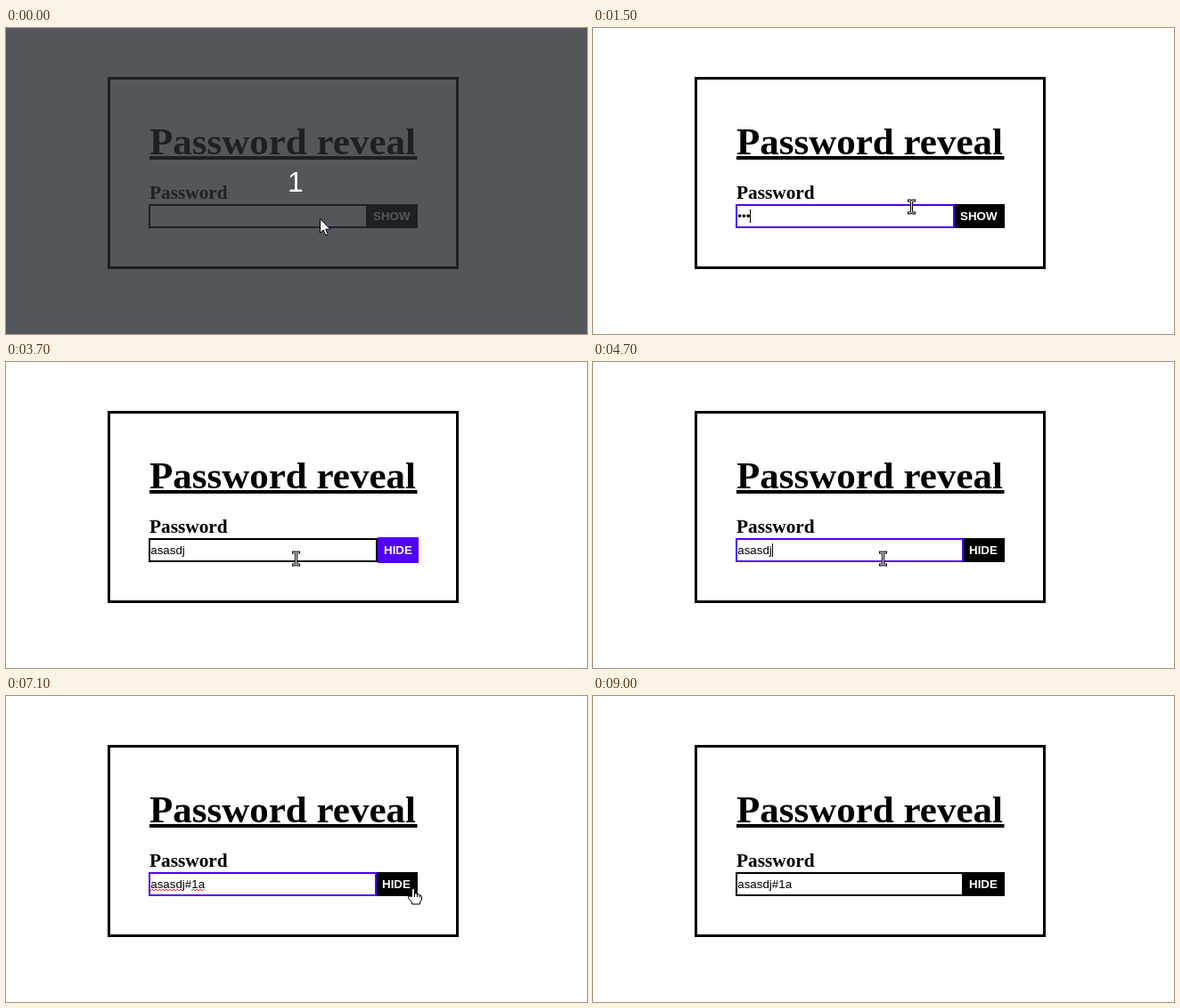
An HTML page that plays this animation: 652 px wide and 344 px high, repeating every 9.1 s.

```html
<!DOCTYPE html>
<html lang="en">
<head>
<meta charset="utf-8">
<title>Password reveal</title>
<style>
  html, body { margin: 0; width: 100%; height: 100%; overflow: hidden; background: #fff; }
  svg { display: block; width: 652px; height: 344px; }
  .serif { font-family: "Liberation Serif", "Times New Roman", serif; font-weight: bold; }
  .sans { font-family: "Liberation Sans", Arial, sans-serif; font-size: 13.333px; }
  .bold { font-weight: bold; }
  .cursor { fill: #fff; stroke: #000; stroke-width: 1; stroke-linejoin: round; }
</style>
</head>
<body>
<svg viewBox="0 0 652 344">
  <rect width="652" height="344" fill="#fff"/>
  <rect x="115.5" y="56.5" width="391" height="213" fill="none" stroke="#000" stroke-width="3"/>
  <text class="serif" x="161" y="142" font-size="43">Password reveal</text>
  <rect x="161" y="144" width="300.5" height="4"/>
  <text class="serif" x="161" y="192" font-size="21.333">Password</text>

  <rect id="button"/>
  <text id="caption" class="sans bold" y="216" fill="#fff"></text>
  <rect id="field" x="161" y="199" height="25" fill="none" stroke-width="2"/>
  <path id="squiggle" fill="none" stroke="#e33" stroke-width="1"/>
  <text id="value" class="sans" x="162.3" y="216"></text>
  <rect id="caret" y="204" width="1" height="15"/>

  <g id="countdown">
    <rect width="652" height="344" fill="rgb(37,41,48)" fill-opacity=".788"/>
    <text class="sans" x="325" y="184" text-anchor="middle" style="font-size:32px" fill="#fff">1</text>
  </g>

  <g id="cursor" class="cursor">
    <path id="arrow" d="M.5 .5V16.5L4.2 13 6.8 19 9.3 18 6.7 12.2H11.8Z"/>
    <g id="beam" fill="none" stroke-linecap="square">
      <path d="M-2.5 -7H-1L.5 -6 2 -7H3.5M.5 -6V6M-2.5 7H-1L.5 6 2 7H3.5" stroke-width="3"/>
      <path d="M-2.5 -7H-1L.5 -6 2 -7H3.5M.5 -6V6M-2.5 7H-1L.5 6 2 7H3.5" stroke="#fff"/>
    </g>
    <g id="hand">
      <path d="M-1.5 8.5V1Q-1.5 -.5 0 -.5T1.5 1V5Q4.3 4.2 4.5 6 7 5 7.3 7 9.5 6.5 9.5 9V12L7.5 15V17H-1.5V15L-5.5 10Q-6 8 -4 8Z"/>
      <path d="M1.5 5V9M4.5 6V9M7.3 7V9.5" fill="none"/>
    </g>
  </g>
</svg>
<script>
const LOOP = 9100;
const PURPLE = '#5000ff';
const $ = id => document.getElementById(id);
const set = (el, attrs) => Object.entries(attrs).forEach(([k, v]) => el.setAttribute(k, v));
const show = (el, on) => el.setAttribute('visibility', on ? 'inherit' : 'hidden');

// Each step changes only the listed properties.
const steps = [
  [0, { overlay: true, typed: '', masked: true, focus: '', caret: false, marks: [] }],
  [100, { overlay: false }],
  [500, { focus: 'field', caret: true }],
  [900, { typed: 'a' }],
  [1100, { typed: 'as' }],
  [1500, { typed: 'asa' }],
  [1700, { typed: 'asas' }],
  [1800, { typed: 'asasdj' }],
  [2400, { caret: false }],
  [2900, { focus: 'button' }],
  [3400, { masked: false }],
  [4700, { focus: 'field', caret: true }],
  [5000, { marks: [[162, 201]] }],
  [5300, { typed: 'asasdj#' }],
  [5800, { typed: 'asasdj#1' }],
  [6200, { typed: 'asasdj#1a' }],
  [6400, { marks: [[162, 201], [208, 223]] }],
  [6700, { caret: false }],
  [7500, { focus: 'button' }],
  [8000, { marks: [] }],
  [9000, { focus: '' }]
];

const moves = [
  [0, 'arrow', 352, 214], [100, 'beam', 354, 217],
  [800, 'beam', 357, 209], [900, 'beam', 357, 201],
  [2600, 'beam', 396, 206], [2700, 'hand', 438, 211], [2800, 'hand', 445, 212], [3000, 'hand', 447, 213],
  [3400, 'hand', 412, 213], [3600, 'beam', 372, 221], [3700, 'beam', 325, 221],
  [6400, 'beam', 336, 218], [6500, 'beam', 375, 205], [6600, 'hand', 422, 202], [6700, 'hand', 455, 207],
  [6800, 'arrow', 488, 215], [6900, 'arrow', 479, 220], [7000, 'hand', 460, 219], [7100, 'hand', 457, 217],
  [8000, 'beam', 400, 203], [8100, 'beam', 321, 186],
  [8400, 'arrow', 284, 160], [8500, 'arrow', 215, 112], [8600, 'arrow', 140, 63],
  [8700, 'arrow', 72, 24], [8800, 'arrow', 28, 1], [9000, '', 0, 0]
];

const zigzag = ([from, to]) => {
  let d = `M${from} 219`;
  for (let x = from + 2, up = true; x <= to; x += 2, up = !up) d += `L${x} ${up ? 217 : 219}`;
  return d;
};

function drawForm(s) {
  const pressed = s.focus === 'button';
  const left = (s.masked ? 404 : 414) + (pressed ? 3 : 0);
  const right = pressed ? 463 : 462;
  const fieldEnd = pressed ? left : left + 2;
  set($('button'), {
    x: left, width: right - left,
    y: pressed ? 197 : 198, height: pressed ? 29 : 27,
    fill: pressed ? PURPLE : '#000'
  });
  $('caption').textContent = s.masked ? 'SHOW' : 'HIDE';
  set($('caption'), { x: left + (pressed ? 7 : 8) });
  set($('field'), { width: fieldEnd - 162, stroke: s.focus === 'field' ? PURPLE : '#000' });
  $('value').textContent = s.masked ? '•'.repeat(s.typed.length) : s.typed;
  const advance = s.typed ? $('value').getComputedTextLength() : 0;
  set($('caret'), { x: Math.round(162 + advance) });
  show($('caret'), s.caret);
  set($('squiggle'), { d: s.marks.map(zigzag).join('') });
  show($('countdown'), s.overlay);
}

function drawCursor([, kind, x, y]) {
  for (const id of ['arrow', 'beam', 'hand']) show($(id), id === kind);
  set($('cursor'), { transform: `translate(${x} ${y})` });
}

const start = performance.now();
let last = '';
function frame() {
  const t = (performance.now() - start) % LOOP;
  const past = steps.filter(([at]) => at <= t);
  const move = moves.filter(([at]) => at <= t).pop();
  const key = past.length + ':' + move[0];
  if (key !== last) {
    drawForm(Object.assign({}, ...past.map(([, change]) => change)));
    drawCursor(move);
    last = key;
  }
  requestAnimationFrame(frame);
}
frame();
</script>
</body>
</html>
```
